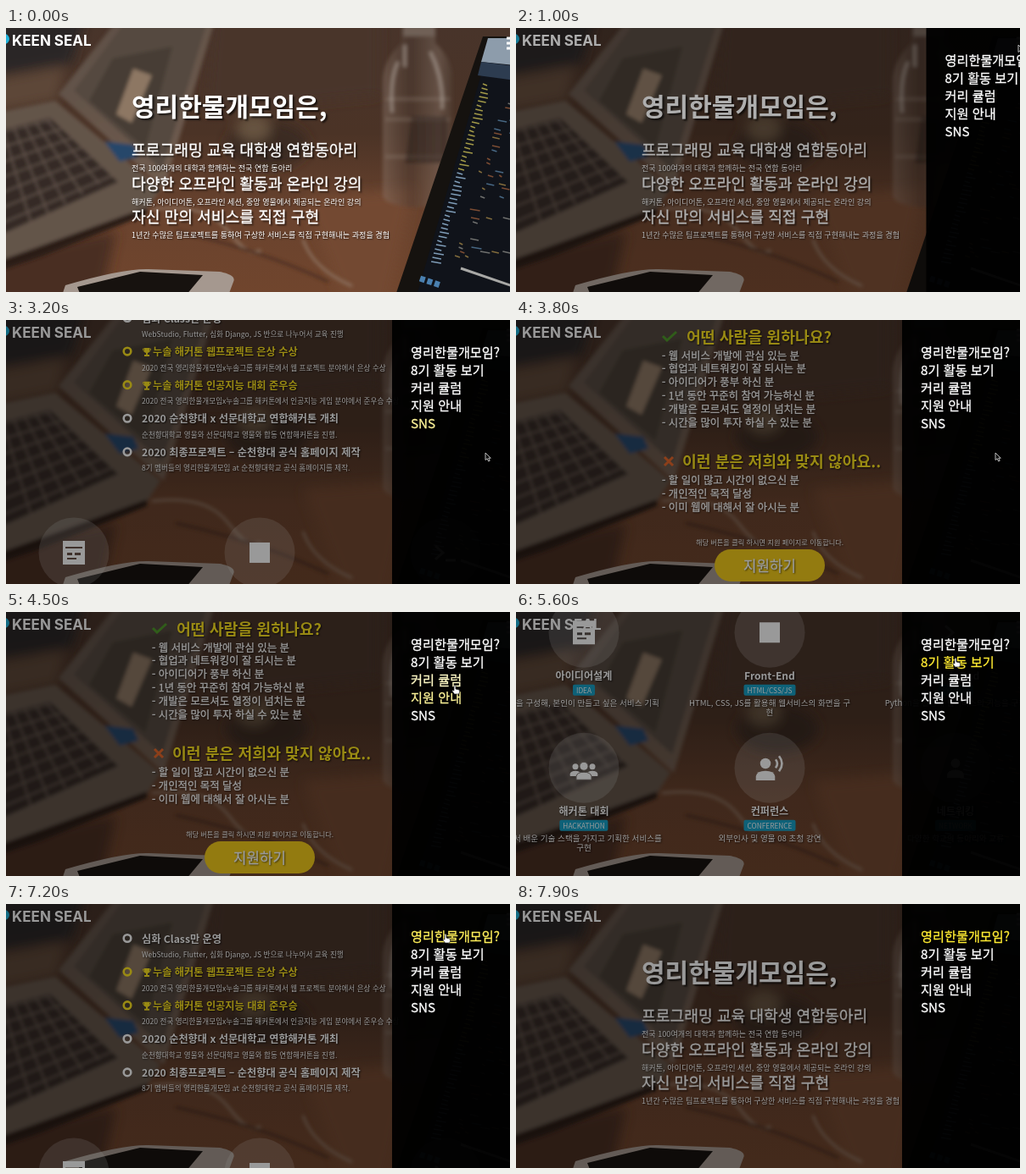
These frames come from a looping animation (594x312 px, 8 s). An HTML page:

```html
<!DOCTYPE html>
<html lang="ko">
<head>
<meta charset="utf-8">
<style>
html, body { margin: 0; width: 594px; height: 312px; overflow: hidden; background: #000; }
body { position: relative; font-family: "Noto Sans CJK KR", "Noto Sans CJK", "Noto Sans", sans-serif; color: #fff; }
svg, #page, #dim, #panel { position: absolute; left: 0; top: 0; }
svg { overflow: visible; }
#bg { overflow: hidden; }
#page { width: 594px; height: 1232px; }
#dim { width: 594px; height: 312px; background: #000; }
#panel { left: 455px; width: 139px; height: 312px; background: rgba(0,0,0,.95); }
.t { position: absolute; white-space: pre; line-height: 20px; height: 20px; text-shadow: 1px 1px 2px rgba(0,0,0,.7); }
.c { transform: translateX(-50%); }
.b { font-weight: 700; }
.m { font-weight: 500; -webkit-text-stroke: .3px; }
.hero { text-shadow: 2px 2px 2px rgba(0,0,0,.65); }
.tag { position: absolute; transform: translate(-50%, -50%); background: #17a2c8; border-radius: 2px; padding: 0 4px; font-size: 8.3px; line-height: 13px; white-space: pre; }
.logo { font-family: Inter, sans-serif; font-weight: 700; text-shadow: none; }
</style>
</head>
<body>
<svg id="bg" width="594" height="312" viewBox="0 0 594 312">
  <defs>
    <linearGradient id="room" x2="0" y2="1">
      <stop offset="0" stop-color="#48342a"/><stop offset=".4" stop-color="#4b3326"/>
      <stop offset=".7" stop-color="#6a432e"/><stop offset="1" stop-color="#70452d"/>
    </linearGradient>
    <linearGradient id="lid" x2=".6" y2="1">
      <stop offset="0" stop-color="#5c4e45"/><stop offset="1" stop-color="#6f5c4f"/>
    </linearGradient>
    <linearGradient id="glass">
      <stop offset="0" stop-color="#8d7a6d" stop-opacity=".45"/><stop offset=".4" stop-color="#4a3a31" stop-opacity=".4"/>
      <stop offset=".8" stop-color="#8d7c70" stop-opacity=".4"/><stop offset="1" stop-color="#54443a" stop-opacity=".4"/>
    </linearGradient>
    <filter id="far"><feGaussianBlur stdDeviation="7"/></filter>
    <filter id="soft"><feGaussianBlur stdDeviation="2"/></filter>
    <filter id="near"><feGaussianBlur stdDeviation=".7"/></filter>
  </defs>
  <rect width="594" height="312" fill="url(#room)"/>
  <g filter="url(#far)">
    <path d="M-20-20H95L78 42L-20 58Z" fill="#2c2726"/>
    <path d="M-20 62L70 45L60 85L-20 100Z" fill="#5d4638"/>
    <path d="M245-20H440V80L235 100Z" fill="#49342a"/>
    <ellipse cx="308" cy="138" rx="48" ry="28" fill="#3a2a23"/>
    <ellipse cx="292" cy="118" rx="20" ry="16" fill="#66523f"/>
    <path d="M-20 268L130 240L110 330H-20Z" fill="#4a2e20"/>
    <path d="M350 200L480 190L450 330H400Z" fill="#734a33"/>
  </g>
  <g filter="url(#soft)">
    <path d="M-10 100L58 86L182 190L164 218L40 262L-10 280Z" fill="#64544a"/>
    <path d="M-10 122L52 106L132 182L-10 246Z" fill="#352b27"/>
    <g id="keys" stroke="#68594f" stroke-width="1.6"></g>
    <path d="M-10 276L40 258L166 212V220L42 270L-10 288Z" fill="#2c1f19"/>
    <path d="M130-8H246L186 190L62 78Z" fill="url(#lid)"/>
    <path d="M138-4H236L184 168L80 74Z" fill="#55483f"/>
    <path d="M126 36L196 22L164 142L98 86Z" fill="#473c35"/>
    <path d="M150 48L172 56L148 112L130 102Z" fill="#8d7763"/>
    <path d="M116 134L150 138L156 152L134 158Z" fill="#25466b"/>
    <path d="M172 214Q236 206 262 240T300 262M350 250Q362 285 408 305" fill="none" stroke="#8b715f" stroke-width="3"/>
    <path d="M200 240Q300 262 380 300" fill="none" stroke="#4b2f21" stroke-width="3"/>
    <path d="M466 0H506V18Q528 38 526 64V198Q524 212 482 212Q446 210 444 198V64Q444 38 466 18Z" fill="url(#glass)"/>
    <path d="M447 84H523M447 108H523M447 152H523" stroke="#a19286" stroke-opacity=".35" stroke-width="3"/>
    <path d="M462 40Q452 60 455 100M500 28Q516 60 514 96M470 20V46" fill="none" stroke="#d8cfc8" stroke-opacity=".4" stroke-width="4"/>
    <path d="M478 104H520V160H470Z" fill="#2c211c" fill-opacity=".5"/>
    <rect x="468" y="-4" width="38" height="14" fill="#6f6056"/>
  </g>
  <g filter="url(#near)">
    <path d="M70 304Q138 284 168 285L252 288Q272 292 268 300L262 316H66Z" fill="#a5988f"/>
    <path d="M84 306L158 288L232 292L212 316H88Z" fill="#17120f"/>
    <path d="M562 10H600V316H459Z" fill="#15120f"/>
    <path d="M572 14H600V316H484Z" fill="#10131a"/>
    <path d="M568 12H600V44L560 40Z" fill="#8d9cab"/>
    <path d="M560 40L600 45V62L556 56Z" fill="#2d3c50"/>
    <g id="code" stroke-width="1.5"></g>
    <path d="M536 284L600 306" stroke="#a8a8a6" stroke-width="3"/>
    <path d="M488 296L512 304" stroke="#4a80b0" stroke-width="7" stroke-dasharray="6 3"/>
  </g>
</svg>

<div id="page"><svg id="art" width="594" height="1232"></svg></div>
<svg width="594" height="312">
  <circle cx="-2" cy="13" r="6" fill="#20b4dc"/>
  <path d="M590 12H594M590 18H594M590 24H594" stroke="#fff" stroke-width="3"/>
</svg>
<div id="head"></div>
<div id="dim"></div>
<div id="panel"></div>
<svg width="594" height="312">
  <g id="cursor" stroke-linejoin="round">
    <path id="arrow" d="M0 0V8.5L2.1 6.8L3.6 10L5.2 9.3L3.7 6.2H6.3Z" fill="#111" stroke="#ccc" stroke-width=".9"/>
    <path id="hand" d="M-1 0Q0-1.5 1 0V4L5 5Q6 5.5 5.5 8L4.5 10H-.5L-3 6.5Q-3 5-1 6Z" fill="#fff" stroke="#222" stroke-width=".7"/>
  </g>
</svg>

<script>
const $ = id => document.getElementById(id);
const clamp = v => Math.max(0, Math.min(1, v));
const swing = v => .5 - Math.cos(Math.PI * clamp(v)) / 2;
const YELLOW = '#ffe620';

// y is the middle of the glyphs
function text(parent, x, y, size, str, cls = '', color = '') {
  const el = document.createElement('div');
  el.className = 't ' + cls;
  el.style.cssText = `left:${x}px;top:${y - 11}px;font-size:${size}px;color:${color}`;
  el.textContent = str;
  parent.append(el);
  return el;
}
const put = (...args) => text($('page'), ...args);
const draw = (id, markup) => $(id).insertAdjacentHTML('beforeend', markup);

// Backdrop details
let seed = 7;
const rnd = () => (seed = seed * 16807 % 2147483647) / 2147483647;
for (let i = 0; i < 7; i++)
  draw('keys', `<path d="M-8 ${124 + i * 18}L${54 + i * 12} ${108 + i * 11}"/>`);
for (let i = 0; i < 5; i++)
  draw('keys', `<path d="M${i * 13 - 4} ${120 - i * 3}L${i * 20 + 30} ${232 - i * 12}"/>`);
const inks = ['#a88a48', '#5a83a6', '#8f8f8a', '#a0603c'];
for (let y = 66; y < 280; y += 5) {
  const left = 562 - (y - 66) * .29;
  draw('code', `<path d="M${left} ${y}l${5 + rnd() * 7} 2" stroke="${y < 170 ? '#a39a48' : '#7f9db8'}"/>`);
  for (let x = left + 24 + rnd() * 14; x < 594 && rnd() < .6; x += 12 + rnd() * 12)
    draw('code', `<path d="M${x} ${y + 3}l${3 + rnd() * 9} 2" stroke="${inks[Math.floor(rnd() * 4)]}" opacity=".75"/>`);
}

// Hero
text($('head'), 7, 16, 17, 'KEEN SEAL', 'logo');
put(148, 91.5, 30, '영리한물개모임은,', 'hero b');
[['프로그래밍 교육 대학생 연합동아리', '전국 100여개의 대학과 함께하는 전국 연합 동아리'],
 ['다양한 오프라인 활동과 온라인 강의', '해커톤, 아이디어톤, 오프라인 세션, 중앙 영물에서 제공되는 온라인 강의'],
 ['자신 만의 서비스를 직접 구현', '1년간 수많은 팀프로젝트를 통하여 구상한 서비스를 직접 구현해내는 과정을 경험']
].forEach(([a, b], i) => {
  put(148, 144 + i * 39.6, 18.2, a, 'hero m');
  put(148, 166 + i * 39.6, 9.1, b);
});

// Timeline
[['심화 Class만 운영', 'WebStudio, Flutter, 심화 Django, JS 반으로 나누어서 교육 진행'],
 ['누솔 해커톤 웹프로젝트 은상 수상', '2020 전국 영리한물개모임x누솔그룹 해커톤에서 웹 프로젝트 분야에서 은상 수상', 1],
 ['누솔 해커톤 인공지능 대회 준우승', '2020 전국 영리한물개모임x누솔그룹 해커톤에서 인공지능 게임 분야에서 준우승 수상', 1],
 ['2020 순천향대 x 선문대학교 연합해커톤 개최', '순천향대학교 영물와 선문대학교 영물와 합동 연합해커톤을 진행.'],
 ['2020 최종프로젝트 – 순천향대 공식 홈페이지 제작', '8기 멤버들의 영리한물개모임 at 순천향대학교 공식 홈페이지를 제작.']
].forEach(([a, b, award], i) => {
  const y = 331.5 + i * 39.6, color = award ? YELLOW : '#fff';
  put(award ? 173 : 160, y, 12.2, a, 'b', color);
  put(160, y + 18.5, 8.6, b);
  draw('art', `<circle cx="143" cy="${y - 1}" r="4.3" fill="none" stroke="${color}" stroke-width="2.6"/>`);
  if (award) draw('art', `<g transform="translate(161 ${y - 5})" fill="${color}">
    <path d="M2 0H8V4Q7 6 6 6V8H8V10H2V8H4V6Q3 6 2 4Z"/>
    <path d="M2 1H.5Q.5 4 3 5M8 1H9.5Q9.5 4 7 5" fill="none" stroke="${color}"/></g>`);
});

// Curriculum
const person = (x, y, k) => `<circle cx="${x}" cy="${y - 5 * k}" r="${5 * k}"/>
  <path d="M${x - 9 * k} ${y + 11 * k}V${y + 7 * k}Q${x - 8 * k} ${y + 2 * k} ${x} ${y + 2 * k}T${x + 9 * k} ${y + 7 * k}V${y + 11 * k}Z"/>`;
const icons = [
  `<path fill-rule="evenodd" d="M-13-14H13V14H-13ZM-10-7H10V-5H-10ZM-8 0V3H-2V0ZM1 0V3H8V0ZM-8 6V8H3V6Z"/>`,
  `<rect x="-12" y="-12" width="24" height="24"/>`,
  `<path d="M-12-8L-3 0L-12 8M0 9H12" fill="none" stroke="#fff" stroke-width="3"/>`,
  person(-10, 2, .7) + person(10, 2, .7) + `<g stroke="#776e69" stroke-width="1">${person(0, 3, 1)}</g>`,
  person(-5, 1, 1.25) + `<path d="M7-10Q11-5 7 0M11-14Q18-5 11 4" fill="none" stroke="#fff" stroke-width="2.6"/>`,
  person(0, 0, 1.1)
];
[['아이디어설계', 'IDEA', '팀을 구성해, 본인이 만들고 싶은 서비스 기획'],
 ['Front-End', 'HTML/CSS/JS', 'HTML, CSS, JS를 활용해 웹서비스의 화면을 구', '현'],
 ['Back-End', 'PYTHON', 'Python을 활용해 웹서비스의 기능을 구현'],
 ['해커톤 대회', 'HACKATHON', '에서 배운 기술 스택을 가지고 기획한 서비스를', '구현'],
 ['컨퍼런스', 'CONFERENCE', '외부인사 및 영물 08 초청 강연'],
 ['네트워킹', 'NETWORK', '다양한 학교의 동아리와 교류']
].forEach(([name, tag, ...lines], i) => {
  const x = 80 + i % 3 * 219, y = 608 + (i > 2 ? 160 : 0);
  draw('art', `<g transform="translate(${x} ${y})" fill="#fff">
    <circle r="41.5" fill-opacity=".17"/>${icons[i]}</g>`);
  put(x, y + 51.5, 12.1, name, 'c b');
  const el = document.createElement('div');
  el.className = 'tag';
  el.style.cssText = `left:${x}px;top:${y + 67.5}px`;
  el.textContent = tag;
  $('page').append(el);
  lines.forEach((s, j) => put(x, y + 83.5 + j * 11.5, 9.6, s, 'c'));
});

// Application
const APPLY = 920;
const list = (y, items) => items.forEach((s, i) => put(172, APPLY + y + i * 15.9, 12.4, '- ' + s, 'm'));
put(201, APPLY + 19.5, 18.3, '어떤 사람을 원하나요?', 'b', YELLOW);
list(42.5, ['웹 서비스 개발에 관심 있는 분', '협업과 네트워킹이 잘 되시는 분', '아이디어가 풍부 하신 분',
  '1년 동안 꾸준히 참여 가능하신 분', '개발은 모르셔도 열정이 넘치는 분', '시간을 많이 투자 하실 수 있는 분']);
put(196, APPLY + 166.5, 18.3, '이런 분은 저희와 맞지 않아요..', 'b', YELLOW);
list(190, ['할 일이 많고 시간이 없으신 분', '개인적인 목적 달성', '이미 웹에 대해서 잘 아시는 분']);
put(299, APPLY + 262.5, 8.2, '해당 버튼을 클릭 하시면 지원 페이지로 이동합니다.', 'c');
draw('art', `<g transform="translate(0 ${APPLY})" fill="none" stroke-width="3">
  <path d="M173 19L178 24L189 14" stroke="#4f9a2c"/>
  <path d="M175 162L185 172M185 162L175 172" stroke="#e8682c"/>
  <rect x="234" y="271" width="130" height="38" rx="19" fill="#f5cd1a"/></g>`);
put(299, APPLY + 290.5, 16.8, '지원하기', 'c m');

const menu = ['영리한물개모임?', '8기 활동 보기', '커리 큘럼', '지원 안내', 'SNS']
  .map((s, i) => text($('panel'), 22, 38.2 + i * 21, 15.2, s, 'm'));

// Motion: [start, duration, from, to]
const scrolls = [[2790, 1000, 0, 920], [4728, 1000, 920, 570], [6222, 600, 570, 290], [7291, 700, 290, 0]];
// [item, start, end of fade]
const hovers = [[3, 1800, 2900], [4, 2750, 3350], [3, 4200, 4650], [2, 4430, 5500], [1, 5300, 7000], [0, 7000, 8400]];
// [time, x, y]
const path = [[500, 592, 20], [1000, 592, 20], [1900, 512, 109.5], [2750, 512, 109.5], [3150, 565, 157], [3900, 565, 157],
  [4300, 524, 104], [4500, 529, 87], [5050, 529, 87], [5400, 518, 55], [6850, 518, 55], [7200, 518, 36]];

function frame(now) {
  const t = now % 8000;
  const open = swing((t - 300) / 1000);
  $('dim').style.opacity = .4 * open;
  $('panel').style.transform = `translateX(${139 * (1 - open)}px)`;

  let y = 0;
  for (const [start, dur, a, b] of scrolls) if (t >= start) y = a + (b - a) * swing((t - start) / dur);
  $('page').style.transform = `translateY(${-y}px)`;

  const glow = [0, 0, 0, 0, 0];
  for (const [i, a, b] of hovers) glow[i] = Math.max(glow[i], clamp(Math.min((t - a) / 250, (b - t) / 300)));
  menu.forEach((el, i) => el.style.color = `rgb(255,${255 - 20 * glow[i]},${255 - 205 * glow[i]})`);

  let k = 0;
  while (k < path.length - 2 && t > path[k + 1][0]) k++;
  const [t0, x0, y0] = path[k], [t1, x1, y1] = path[k + 1], p = swing((t - t0) / (t1 - t0));
  $('cursor').setAttribute('transform', `translate(${x0 + (x1 - x0) * p} ${y0 + (y1 - y0) * p})`);
  $('cursor').style.display = t < 500 || t > 7500 ? 'none' : '';
  const pointing = t > 4250;
  $('arrow').style.display = pointing ? 'none' : '';
  $('hand').style.display = pointing ? '' : 'none';
  requestAnimationFrame(frame);
}
requestAnimationFrame(frame);
</script>
</body>
</html>
```
